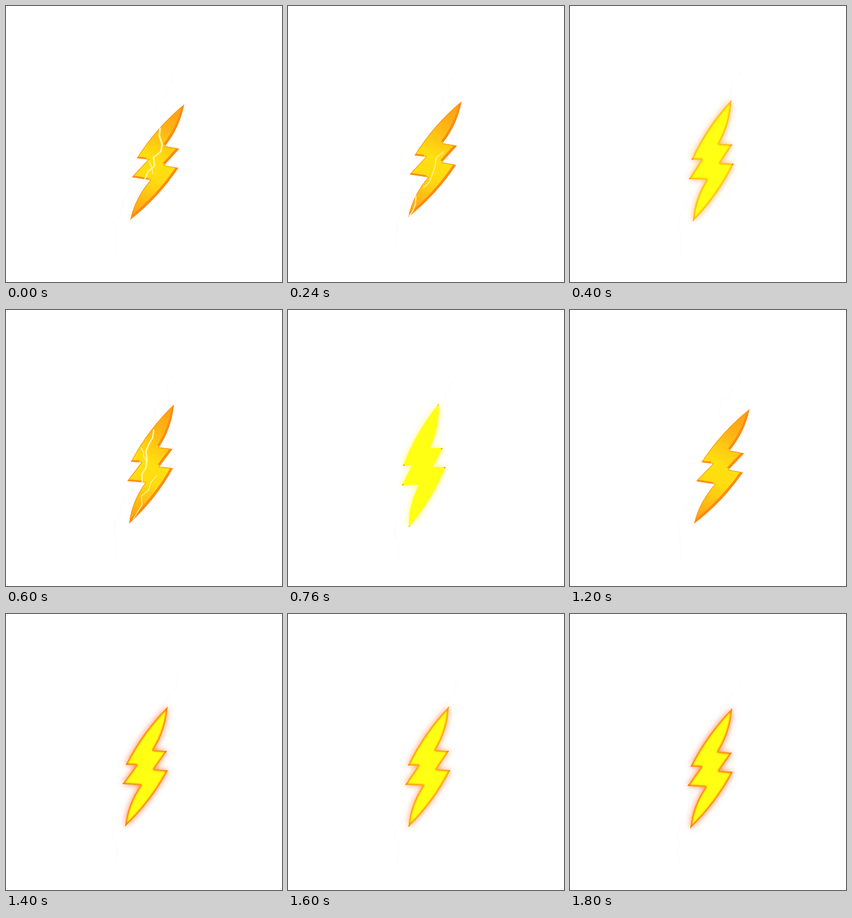
Animation, 480 px wide and 480 px high, one loop 1840 ms. Source, as an HTML page with a canvas:

```html
<!DOCTYPE html>
<html>
<head>
<meta charset="utf-8">
<style>
html, body { margin: 0; width: 100%; height: 100%; overflow: hidden; background: #fff; }
canvas { display: block; width: 480px; height: 480px; }
</style>
</head>
<body>
<canvas id="c" width="480" height="480"></canvas>
<script>
const ctx = document.getElementById('c').getContext('2d');
const LOOP = 1840, STEP = 40;
const MAX_LEAN = 15.3 * Math.PI / 180;

// Bolt corners around its centre, clockwise from the top tip
const BOLT = [[26, -107.5], [11, -30.5], [33, -30.5], [16, 2.5], [38, 2.5],
  [-26, 107.5], [-8, 33.5], [-38, 34.5], [-20, -0.5], [-36, 0.5]];
const isNotch = i => [1, 3, 6, 8].includes(i);

// time, centre x, centre y, lean
const KEYS = [
  [0, 263, 271.5, 0.75],
  [240, 255.5, 266.5, 0.73],
  [420, 246, 269.5, 0.2],
  [600, 253, 268, 0.46],
  [760, 236, 270.5, 0],
  [1000, 267.5, 277, 1],
  [1200, 264, 272, 0.8],
  [1400, 244, 265.5, 0.39],
  [1480, 243, 262, 0.25],
  [1680, 245.5, 268.5, 0.37],
  [LOOP, 245.5, 268.5, 0.37]
];

// Sparks inside the bolt: line ends and width
const BURSTS = [
  { from: 0, to: 120, lines: [[5, -59, 6, -18, 3], [6, -18, -21, 29, 2.6], [-14, -2, -8, 20, 1.5]] },
  { from: 160, to: 320, lines: [[15, -13, -20, 50, 1.6], [-33, 64, -45, 99, 2]] },
  { from: 520, to: 640, lines: [[4, -59, -16, 32, 2.6], [-18, -28, -9, -6, 1.8], [9, 20, -32, 96, 1.4]] }
];

const mix = (a, b, u) => a + (b - a) * u;
const clamp = v => Math.max(0, Math.min(1, v));
const noise = n => {
  const v = Math.sin(n * 127.1) * 43758.5453;
  return (v - Math.floor(v)) * 2 - 1;
};

function poseAt(t) {
  const i = KEYS.findIndex(k => k[0] > t);
  const a = KEYS[i - 1], b = KEYS[i], u = (t - a[0]) / (b[0] - a[0]);
  const [x, y, lean] = [1, 2, 3].map(k => mix(a[k], b[k], u));
  // The bolt lights up as it swings upright
  const flash = clamp((0.46 - lean) / 0.07);
  const peak = clamp((0.37 - lean) / 0.25);
  return { x, y, lean, flash, peak };
}

function corners(lean) {
  const c = Math.cos(lean * MAX_LEAN), s = Math.sin(lean * MAX_LEAN);
  return BOLT.map(([x, y], i) => {
    const pinch = isNotch(i) ? 1 - 0.28 * lean : 1;
    return [(x * c - y * s) * pinch, x * s + y * c];
  });
}

// Long edges bow outwards
function boltPath(pts) {
  const p = new Path2D();
  p.moveTo(...pts[0]);
  pts.forEach((a, i) => {
    const b = pts[(i + 1) % pts.length];
    const dx = b[0] - a[0], dy = b[1] - a[1], len = Math.hypot(dx, dy);
    const k = len > 60 ? 10 / len : 0;
    p.quadraticCurveTo((a[0] + b[0]) / 2 + dy * k, (a[1] + b[1]) / 2 - dx * k, b[0], b[1]);
  });
  p.closePath();
  return p;
}

function jagged(x1, y1, x2, y2, width, color, seed) {
  const len = Math.hypot(x2 - x1, y2 - y1), n = Math.max(3, Math.round(len / 14));
  ctx.beginPath();
  for (let i = 0; i <= n; i++) {
    const off = i % n ? noise(seed + i) * Math.min(6, len * 0.12) : 0;
    ctx.lineTo(mix(x1, x2, i / n) + off, mix(y1, y2, i / n) + off * 0.4);
  }
  ctx.lineWidth = width;
  ctx.strokeStyle = color;
  ctx.stroke();
}

function drawBody(path, t) {
  ctx.fillStyle = '#fb8b17';
  ctx.fill(path);
  ctx.save();
  ctx.clip(path);
  const g = ctx.createLinearGradient(45, -100, -45, 100);
  g.addColorStop(0, '#ff9a12');
  g.addColorStop(0.25, '#fdb615');
  g.addColorStop(0.5, '#ffe00e');
  g.addColorStop(0.65, '#ffdc10');
  g.addColorStop(1, '#ff9c14');
  ctx.save();
  ctx.translate(-3, -3.4);
  ctx.fillStyle = g;
  ctx.fill(path);
  ctx.restore();
  ctx.strokeStyle = '#fb9416';
  ctx.lineWidth = 2;
  ctx.stroke(path);
  const burst = BURSTS.find(b => t >= b.from && t <= b.to);
  if (burst) burst.lines.forEach((l, i) => jagged(...l, '#fff4a0', burst.from + i * 9));
  ctx.restore();
}

function drawFlash(path, pts, flash, peak) {
  ctx.save();
  ctx.globalAlpha = flash;
  ctx.shadowBlur = 11;
  ctx.shadowColor = `rgba(255,${mix(100, 245, peak)},${mix(40, 70, peak)},0.8)`;
  ctx.fillStyle = '#ffff14';
  ctx.fill(path);
  ctx.shadowColor = 'transparent';
  ctx.clip(path);
  ctx.globalAlpha = flash * (1 - peak);
  ctx.filter = 'blur(1.3px)';
  ctx.lineWidth = 5;
  ctx.strokeStyle = '#ff8210';
  ctx.stroke(path);
  ctx.filter = 'none';
  ctx.globalAlpha = flash * 0.8;
  ctx.fillStyle = '#ff6e0a';
  pts.forEach(([x, y], i) => {
    if (isNotch(i)) return;
    ctx.beginPath();
    ctx.arc(x, y, 3, 0, 7);
    ctx.fill();
  });
  ctx.restore();
}

function draw(t) {
  const { x, y, lean, flash, peak } = poseAt(t);
  const pts = corners(lean), path = boltPath(pts);
  ctx.fillStyle = '#fff';
  ctx.fillRect(0, 0, 480, 480);
  ctx.lineJoin = ctx.lineCap = 'round';
  jagged(297, 109, 258, 184, 1, '#fafafa', t);
  jagged(216, 317, 188, 375, 1, '#fafafa', t + 11);
  jagged(188, 375, 191, 430, 1, '#fafafa', t + 23);
  ctx.save();
  ctx.translate(x, y);
  if (flash < 1) drawBody(path, t);
  if (flash > 0) drawFlash(path, pts, flash, peak);
  ctx.restore();
}

const start = performance.now();
function tick() {
  const t = (performance.now() - start) % LOOP;
  draw(Math.floor(t / STEP) * STEP);
  requestAnimationFrame(tick);
}
tick();
</script>
</body>
</html>
```
